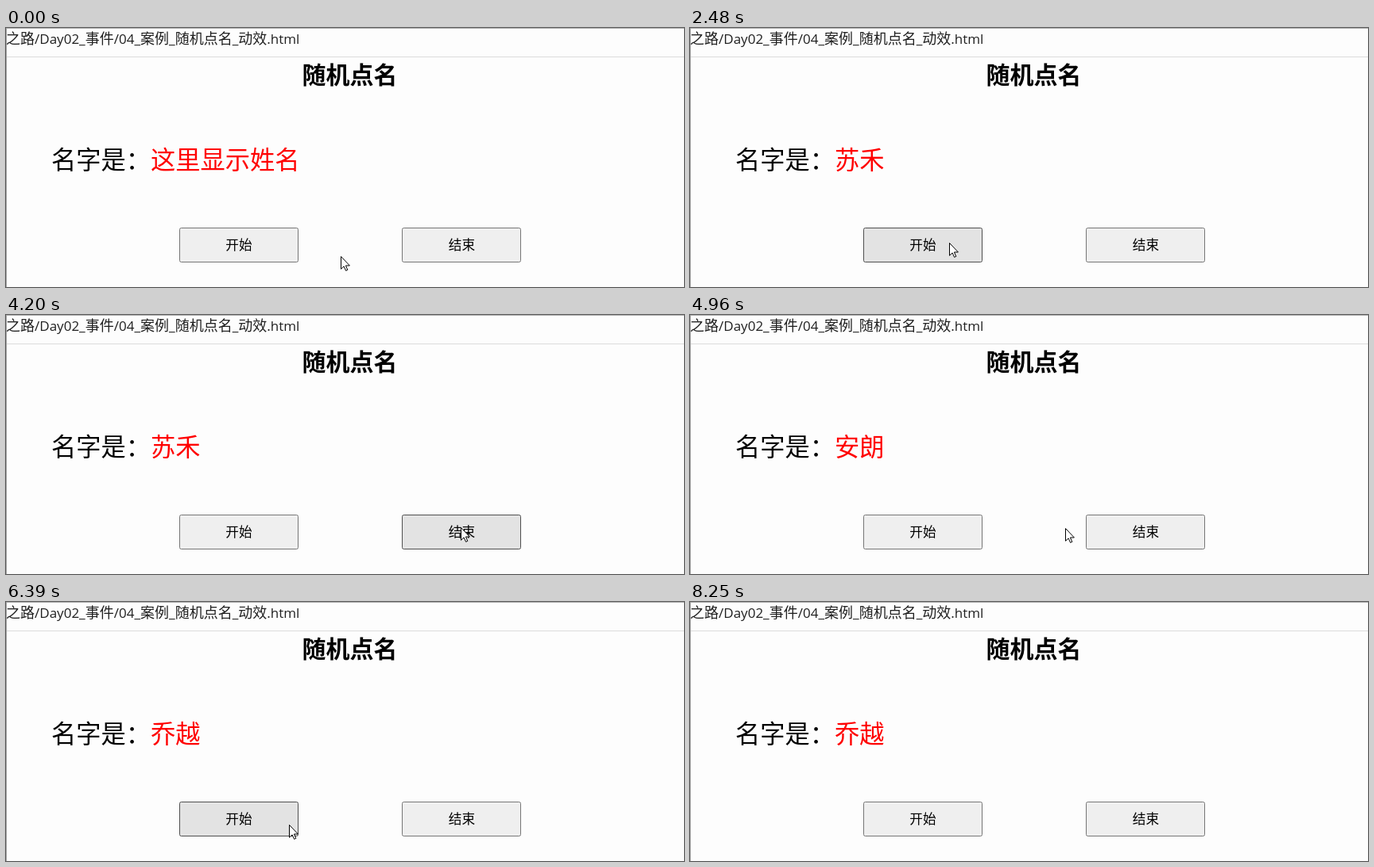
Write an HTML page that moves like this. It is 853x327 px and loops after 8570 ms.

```html
<!DOCTYPE html>
<html lang="zh-CN">
<head>
<meta charset="utf-8">
<title>随机点名</title>
<style>
  html, body { margin: 0; width: 100%; height: 100%; overflow: hidden; background: #fdfdfd; }
  svg { display: block; width: 853px; height: 327px; font-family: "Noto Sans CJK SC", "Noto Sans CJK", sans-serif; }
  .path { font-size: 18px; fill: #202020; }
  .path tspan { font: 17px "Open Sans", "Noto Sans", sans-serif; }
  .title { font-size: 30px; font-weight: 700; }
  .line { font-size: 31.25px; }
  .btn rect { width: 149px; height: 43px; fill: #efefef; stroke: #767676; }
  .btn.hover rect { fill: #e3e3e3; stroke: #4f4f4f; }
  .btn text { font-size: 16.67px; text-anchor: middle; }
</style>
</head>
<body>
<svg viewBox="0 0 853 327">
  <path d="M0 .5H853" stroke="#b4b4b4"/>
  <path d="M.5 0V327" stroke="#a0a0a0"/>
  <path d="M1 36.5H853" stroke="#dcdcdc"/>
  <text class="path" x="0" y="20">之路<tspan>/Day02_</tspan>事件<tspan>/04_</tspan>案例<tspan>_</tspan>随机点名<tspan>_</tspan>动效<tspan>.html</tspan></text>
  <text class="title" x="372.5" y="70">随机点名</text>
  <text class="line" x="57" y="178">名字是：</text>
  <text class="line" id="name" x="182" y="178" fill="#f00">这里显示姓名</text>
  <g class="btn" id="start">
    <rect x="218.5" y="252.5" rx="2"/>
    <text x="293" y="280.3">开始</text>
  </g>
  <g class="btn" id="stop">
    <rect x="498.5" y="252.5" rx="2"/>
    <text x="573.5" y="280.3">结束</text>
  </g>
  <path id="cursor" d="M.5 .5V16.3L4.1 12.9 6.6 18.4 8.8 17.4 6.4 12H11.4Z" fill="#fff" stroke="#000"/>
</svg>
<script>
const LOOP = 8570, GONE = 8250;
const names = {
  "-": "这里显示姓名", a: "苏禾", b: "安朗", c: "乔越", d: "白棠", e: "温朴"
};

// first step, last step, one name key per step
const runs = [
  [0, 0, "-"], [1200, 1590, "----"], [2030, 2180, "cb"], [2480, 2770, "adb"],
  [3380, 4200, "ecdbeca"], [4320, 4440, "db"], [4720, 5260, "bbbbb"],
  [5540, 5690, "db"], [5840, 6390, "aecdc"], [6540, 6540, "a"],
  [6660, 7370, "ecdab"], [7830, GONE, "cccc"]
];
const steps = runs.flatMap(([from, to, keys]) => [...keys].map((key, i) => ({
  time: from + (to - from) * i / Math.max(1, keys.length - 1),
  name: names[key]
})));

// pointer moves: begin, end, target x, target y
const origin = [421, 288];
const moves = [
  [1070, 1590, 326, 271], [3380, 4200, 572, 268], [4580, 5260, 293, 272],
  [5980, 6390, 356, 281], [6390, 6540, 427, 281], [6540, 7370, 596, 279],
  [7690, 8110, 691, 317]
];

const [label, start, stop, cursor] = ["name", "start", "stop", "cursor"].map(id => document.getElementById(id));

function pointerAt(t) {
  let [x, y] = origin;
  for (const [from, to, tx, ty] of moves) {
    const u = Math.min(1, Math.max(0, (t - from) / (to - from)));
    const k = u * u * (3 - 2 * u);
    x += (tx - x) * k;
    y += (ty - y) * k;
  }
  return [Math.round(x), Math.round(y)];
}

function draw(now) {
  const t = now % LOOP;
  const { time, name } = steps.findLast(s => s.time <= t);
  const [x, y] = pointerAt(time);
  const over = left => x >= left && x < left + 150 && y >= 252 && y < 296;
  label.textContent = name;
  start.classList.toggle("hover", over(218));
  stop.classList.toggle("hover", over(498));
  cursor.setAttribute("transform", `translate(${x} ${y})`);
  cursor.setAttribute("visibility", time < GONE ? "visible" : "hidden");
}

const t0 = performance.now();
function tick() {
  draw(performance.now() - t0);
  requestAnimationFrame(tick);
}
tick();
</script>
</body>
</html>
```
